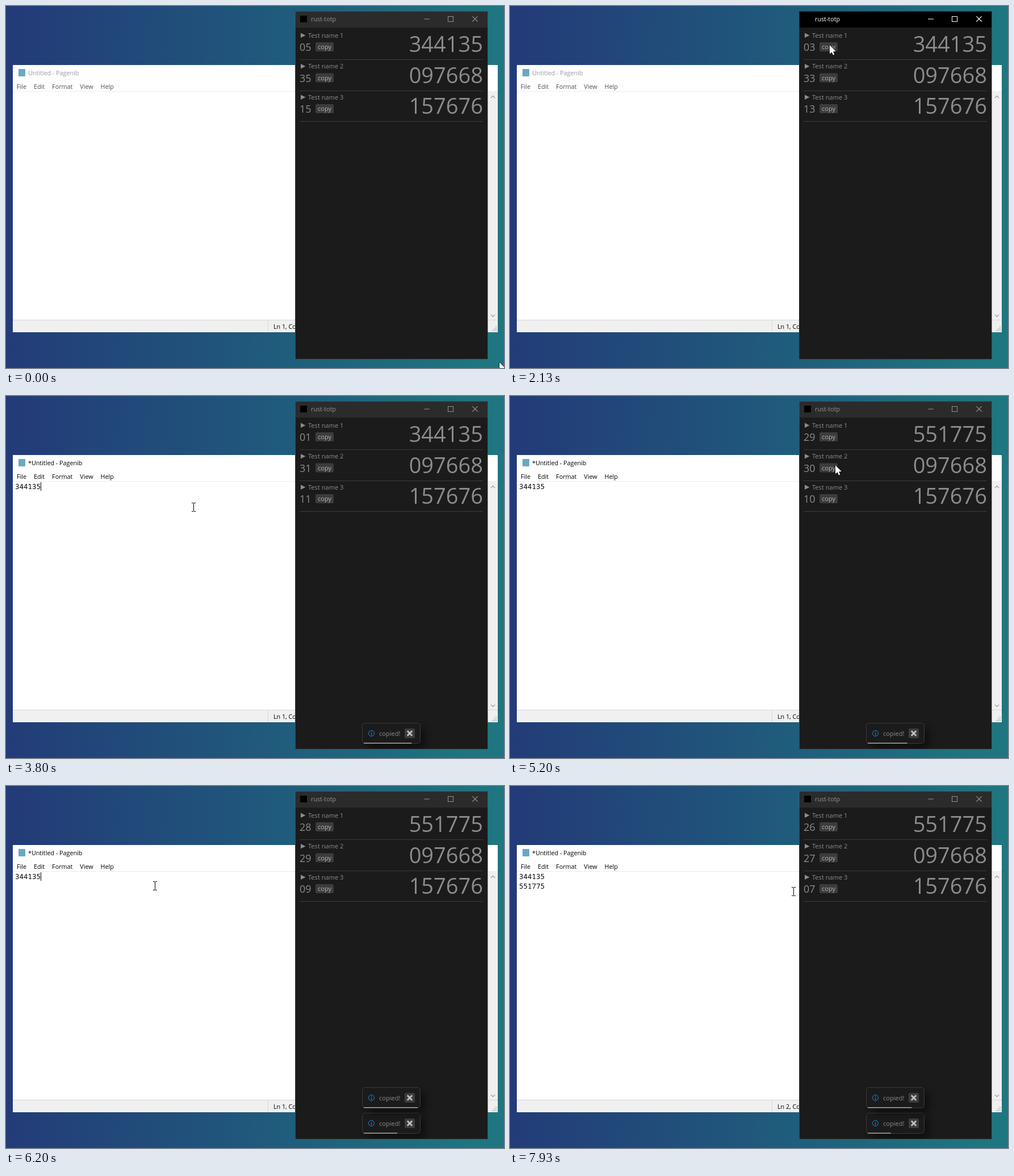
An HTML page with a canvas that plays this animation: 877 px wide and 638 px high, repeating every 8 s.

```html
<!DOCTYPE html>
<html lang="en">
<head>
<meta charset="utf-8">
<style>
html, body { margin: 0; width: 100%; height: 100%; overflow: hidden; }
canvas { display: block; }
</style>
</head>
<body>
<canvas id="stage" width="877" height="638"></canvas>
<script>
const ctx = document.getElementById('stage').getContext('2d');
const LOOP = 8000;
const sans = size => `${size}px "Open Sans", sans-serif`;
const UI = sans(10.75);
const MONO = '12.5px "Noto Sans Mono", monospace';

// Moments at which something happens, in ms
const T = {
  leave: 330, enter: 730, copy1: 2130, focus1: 2730, paste1: 3330, newCode: 4470,
  copy2: 5670, focus2: 6130, newLine: 6660, paste2: 6930
};

// Pointer stops: arrival time, x, y; each move takes at most MOVE ms
const MOVE = 400;
const STOPS = [
  [130, 869, 628], [T.leave, 878, 640], [T.enter, 848, 232], [1130, 632, 79], [1470, 563, 69],
  [2670, 328, 207], [3300, 330, 196], [5200, 573, 122], [5470, 564, 68], [6180, 262, 176],
  [7930, 499, 186]
];

function pointerAt(t) {
  const next = STOPS.findIndex(s => s[0] > t);
  if (next < 0) return STOPS.at(-1).slice(1);
  const [t1, x1, y1] = STOPS[next];
  const [t0, x0, y0] = STOPS[Math.max(0, next - 1)];
  const k = Math.max(0, 1 - (t1 - t) / Math.min(MOVE, t1 - t0 || MOVE));
  return [x0 + (x1 - x0) * k, y0 + (y1 - y0) * k];
}

function rect(x, y, w, h, color) {
  ctx.fillStyle = color;
  ctx.fillRect(x, y, w, h);
}

function rounded(x, y, w, h, r, fill, stroke) {
  ctx.beginPath();
  ctx.roundRect(x, y, w, h, r);
  ctx.fillStyle = fill;
  ctx.fill();
  if (stroke) {
    ctx.strokeStyle = stroke;
    ctx.lineWidth = 1;
    ctx.stroke();
  }
}

function text(str, x, y, color, font = UI, align = 'left') {
  ctx.font = font;
  ctx.fillStyle = color;
  ctx.textAlign = align;
  ctx.fillText(str, x, y);
}

function line(color, width, ...points) {
  ctx.beginPath();
  points.forEach(([x, y]) => ctx.lineTo(x, y));
  ctx.strokeStyle = color;
  ctx.lineWidth = width;
  ctx.stroke();
}

function cross(x, y, r, color, width) {
  line(color, width, [x - r, y - r], [x + r, y + r]);
  line(color, width, [x + r, y - r], [x - r, y + r]);
}

function polygon(fill, points) {
  ctx.beginPath();
  points.forEach(([x, y]) => ctx.lineTo(x, y));
  ctx.closePath();
  ctx.fillStyle = fill;
  ctx.fill();
}

function drawDesktop() {
  const g = ctx.createLinearGradient(0, 0, 877, 40);
  g.addColorStop(0, '#233a78');
  g.addColorStop(0.45, '#20547b');
  g.addColorStop(1, '#1e7780');
  rect(0, 0, 877, 638, g);
}

function scrollArrow(y, dir) {
  line('#a0a0a0', 1.3, [854, y + 2 * dir], [857.5, y - 1.5 * dir], [861, y + 2 * dir]);
}

function drawEditor(t, active) {
  const lines = [];
  if (t >= T.paste1) lines.push('344135');
  if (t >= T.newLine) lines.push(t >= T.paste2 ? '551775' : '');

  rect(12, 104, 854, 471, '#fff');
  rect(22, 111, 12, 13, '#69a9c2');
  text((lines.length ? '*' : '') + 'Untitled - Pagenib', 39, 122, active ? '#000' : '#999');
  let menuX = 19;
  for (const name of ['File', 'Edit', 'Format', 'View', 'Help']) {
    text(name, menuX, 146, active ? '#000' : '#4d4d4d');
    menuX += ctx.measureText(name).width + 13;
  }
  rect(12, 150, 854, 1, '#ececec');

  rect(849, 151, 17, 403, '#f0f0f0');
  scrollArrow(160, 1);
  scrollArrow(546, -1);

  rect(12, 553, 854, 22, '#f0f0f0');
  rect(12, 553, 854, 1, '#d7d7d7');
  rect(461, 555, 1, 19, '#d7d7d7');
  text(`Ln ${Math.max(1, lines.length)}, Col 7`, 471, 569, '#000');
  for (let i = 0; i < 3; i++)
    for (let j = 0; j <= i; j++) rect(862 - 3 * j, 565 + 3 * i, 2, 2, '#bfbfbf');

  lines.forEach((s, i) => text(s, 16, 164 + 17 * i, '#000', MONO));
  if (active) {
    const since = [T.paste2, T.newLine, T.focus2, T.paste1, T.focus1].find(s => t >= s);
    const row = Math.max(0, lines.length - 1);
    const x = lines[row] ? 61 : 16;
    if ((t - since) % 1060 < 530) rect(x, 152 + 17 * row, 1, 15, '#000');
  }
}

function drawEntry(index, seconds, code) {
  const y = 54.5 * index;
  polygon('#8c8c8c', [[519, 47.5 + y], [527.5, 51.7 + y], [519, 56 + y]]);
  text(`Test name ${index + 1}`, 532, 55.5 + y, '#8c8c8c', sans(11.1));
  text(String(seconds).padStart(2, '0'), 517, 79 + y, '#8c8c8c', sans(18));
  rounded(545, 64 + y, 32, 16, 2, '#3c3c3c');
  text('copy', 561, 76 + y, '#b4b4b4', sans(11.1), 'center');
  text(code, 840, 81 + y, '#8c8c8c', sans(38), 'right');
  rect(517, Math.round(94 + y), 323, 1, '#3c3c3c');
}

function drawToast(age, y) {
  if (age < 0) return;
  const left = 1 - Math.min(1, age / 250);
  ctx.save();
  ctx.translate(103 * left ** 3, y);
  ctx.save();
  ctx.shadowColor = 'rgba(0,0,0,.55)';
  ctx.shadowBlur = 16;
  ctx.shadowOffsetX = ctx.shadowOffsetY = 8;
  rounded(628, 577, 101, 35, 5, '#1b1b1b');
  ctx.restore();
  rounded(627.5, 576.5, 102, 36, 5, '#1b1b1b', '#3c3c3c');

  rounded(638.5, 589.5, 10, 10, 5, '#1b1b1b', '#1b8fdc');
  rect(643, 591.5, 1.2, 1.3, '#1b8fdc');
  rect(643, 593.8, 1.2, 3.8, '#1b8fdc');
  text('copied!', 657, 598.5, '#8c8c8c', sans(11.1));
  rounded(702, 586, 18, 17, 2, '#3c3c3c');
  cross(711, 594.5, 4.2, '#c0c0c0', 2.8);
  const end = Math.min(725, 728 - 0.0105 * (age - 250));
  rect(630, 611, end - 630, 1.5, '#a0a0a0');
  ctx.restore();
}

function drawApp(t, active) {
  const fg = active ? '#fff' : '#929292';
  rect(509, 9, 339.5, 613.5, active ? '#303030' : '#484848');
  rect(510, 10, 338, 612, '#1b1b1b');
  rect(510, 10, 338, 28, active ? '#000' : '#2b2b2b');
  rect(518, 17, 12, 12, '#000');
  text('rust-totp', 537, 27, fg);
  rect(736, 22.5, 10, 1, fg);
  ctx.strokeStyle = fg;
  ctx.lineWidth = 1;
  ctx.strokeRect(778.5, 18.5, 9, 9);
  cross(826, 22.8, 4.7, fg, 1.1);

  const ticks = Math.floor((t + 530) / 1000);
  const renewed = t >= T.newCode;
  drawEntry(0, (renewed ? 34 : 5) - ticks, renewed ? '551775' : '344135');
  drawEntry(1, 35 - ticks, '097668');
  drawEntry(2, 15 - ticks, '157676');

  ctx.save();
  ctx.beginPath();
  ctx.rect(510, 38, 338, 584);
  ctx.clip();
  drawToast(t - T.copy1 - 100, 0);
  drawToast(t - T.copy2 - 40, -45);
  ctx.restore();
}

function drawPointer(t) {
  if (t > T.leave && t < T.enter) return;
  const [x, y] = pointerAt(t).map(Math.round);
  const overText = x > 12 && x < 509 && y > 150 && y < 553;
  ctx.save();
  ctx.translate(x, y);
  if (overText) {
    rect(0, -7, 1, 14, '#000');
    for (const side of [-8, 7]) {
      rect(-3, side, 3, 1, '#000');
      rect(1, side, 3, 1, '#000');
    }
  } else {
    const arrow = [[0, 0], [0, 15.5], [3.6, 12.2], [6, 17.5], [8.4, 16.4], [6.1, 11.3], [11, 11]];
    line('#000', 1.4, ...arrow, [0, 0]);
    polygon('#fff', arrow);
  }
  ctx.restore();
}

function draw() {
  const t = performance.now() % LOOP;
  const appActive = (t >= T.copy1 && t < T.focus1) || (t >= T.copy2 && t < T.focus2);
  drawDesktop();
  drawEditor(t, t >= T.focus1 && !appActive);
  drawApp(t, appActive);
  drawPointer(t);
  requestAnimationFrame(draw);
}
draw();
</script>
</body>
</html>
```
